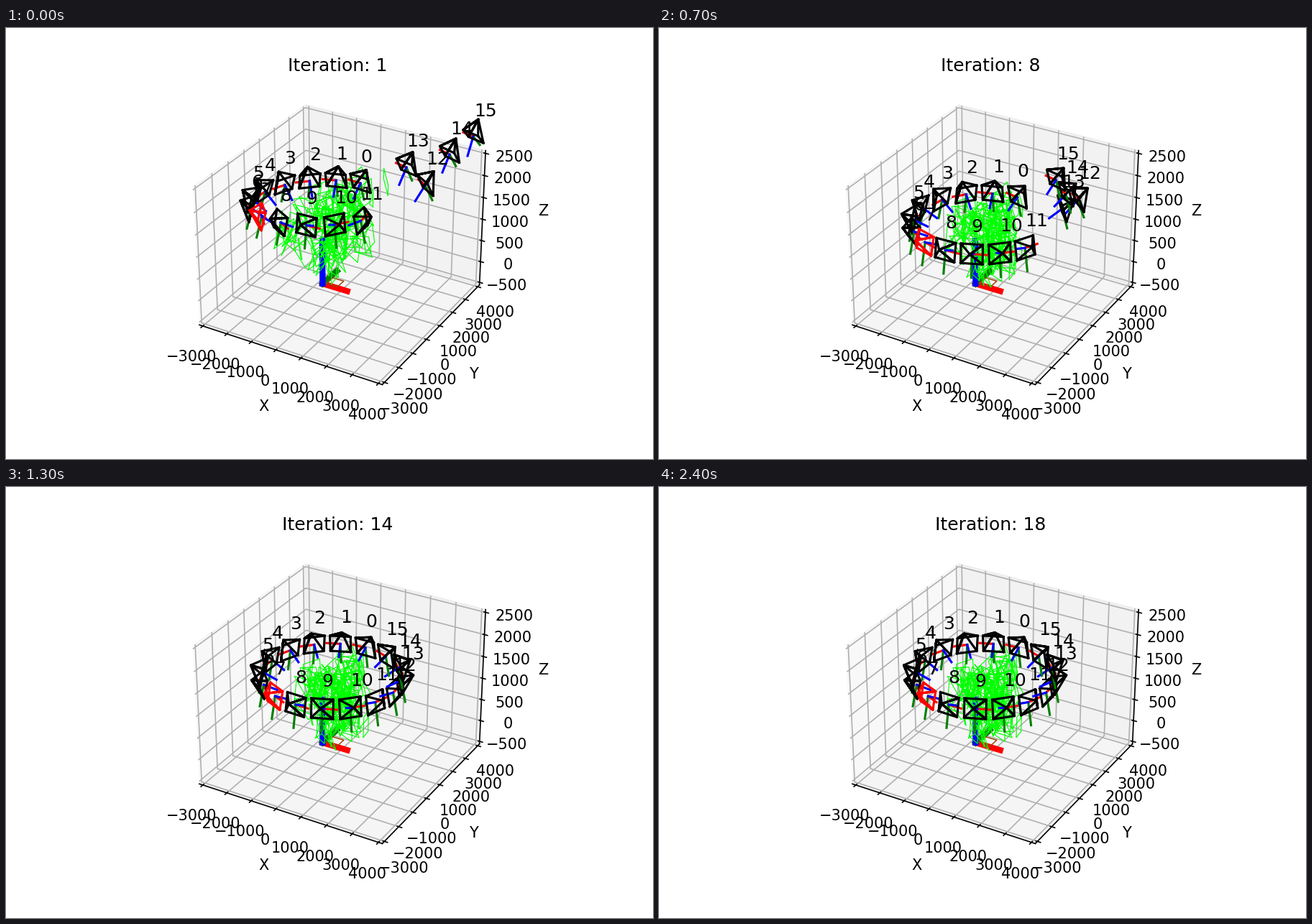
Recreate the animation shown at these times as a matplotlib script. Size 900 by 600 pixels, loop 2500 ms.

```python
import matplotlib.pyplot as plt
import numpy as np
from matplotlib.animation import FuncAnimation

plt.rcParams["figure.subplot.bottom"] = 0.125

FRAMES, INTERVAL = 25, 100
LAST_ITERATION = 18
SETTLED = 13
CAMS = 16
LOW = np.array([-3000, -3000, -500])
HIGH = np.array([4000, 4000, 2500])

# View of the default 3D camera (elev 30, azim -60), in stage pixels
CENTRE = (LOW + HIGH) / 2
SCALE = 1.82946407 / np.sqrt(41) * np.array([4, 4, 3]) / (HIGH - LOW)
C30 = np.sqrt(3) / 2
RIGHT = np.array([C30, 0.5, 0])
UP = np.array([-0.25, C30 / 2, C30])
BACK = np.array([C30 / 2, -0.75, 0.5])
NEAR = np.array([0.5, -C30, 0])
ZAXIS = np.array([0, 0, 1.0])
SIDE = 453
ZOOM = SIDE / 0.185
MID = np.array([461.25 + SIDE * (0.095 / 0.185 - 0.5),
                72 + SIDE * 0.09 / 0.185])


def lift(stage, z=1500):
    """Points of the horizontal plane z that are seen at stage pixels."""
    h, v = ((stage - MID) / ZOOM).T[:, :, None]
    ray = h * RIGHT - v * UP - BACK
    depth = ((z - CENTRE[2]) * SCALE[2] - 10 * BACK[2]) / ray[:, 2:]
    return CENTRE + (10 * BACK + depth * ray) / SCALE


# The cameras end on a ring; the last four begin far away from it
phi = np.radians(22.5 * np.arange(CAMS) - 210)
RING = np.column_stack([453 + 97 * np.sin(phi) * (1 + 0.035 * np.cos(phi)),
                        263.5 + 45.5 * np.cos(phi)])
START = np.array([[583, 219], [557, 194], [617, 176], [650, 151]])
PARKED = np.array([[628, 190], [590, 205], [618, 179], [614, 150]])
PARK_STEP = 3
RELEASE = np.array([[5], [3], [3], [3]])

AXIS = 500
HALF_W, HALF_H, DEPTH = 370, 205, 440
EDGES = [1, 2, 3, 4, 1, 0, 2, 0, 3, 0, 4]
LABEL_RISE = 480 * ZAXIS

# Calibration boards
BOARDS = 95
rng = np.random.default_rng(12)
turn = rng.uniform(0, 2 * np.pi, BOARDS)
radius = 1150 * np.sqrt(rng.uniform(0, 1, BOARDS))
home = np.column_stack([390 + radius * np.cos(turn),
                        80 + radius * np.sin(turn),
                        rng.uniform(420, 1680, BOARDS)])
drift = rng.normal(0, 1, (BOARDS, 1)).clip(-2, 2) * (480 * RIGHT + 190 * ZAXIS)
drift += 250 * ZAXIS - 150 * RIGHT
yaw = rng.uniform(0, 2 * np.pi, BOARDS)
edge_a = 290 * np.column_stack([np.cos(yaw), np.sin(yaw),
                                rng.normal(0, 0.25, BOARDS)])
edge_b = rng.normal(0, 1, (BOARDS, 3)) * [110, 110, 0] + 215 * ZAXIS


def drag(step):
    return max(1 - step / 9, 0)


def stage_positions(step):
    """Ring that drifts and bobs into place, with strays flying in."""
    pull, near = drag(step), np.cos(phi)
    bob = -20 * np.cos(np.pi * step / 6.6) * max(1 - step / SETTLED, 0)
    stage = RING + np.column_stack([-pull * (14 + 8 * near),
                                    bob - 14 * pull * near])
    away = START + (PARKED - START) * min(step / PARK_STEP, 1)
    done = np.clip((step - RELEASE) / (SETTLED - RELEASE), 0, 1)
    stage[-4:] = RING[-4:] + (1 - done) ** 2.5 * (away - RING[-4:])
    return stage


def camera_frames(step):
    """Positions and right, down, forward vectors of all cameras."""
    stage, pull = stage_positions(step), drag(step)
    pos = lift(stage)
    to = lift(np.array([[453 - 13 * pull, 264 - 10 * pull]])) - pos
    psi = np.arctan2(to @ RIGHT, to @ NEAR)[:, None]
    offset = np.linalg.norm(stage - RING, axis=1)[:, None]
    pitch = np.radians(18 + 0.2 * offset + 10 * pull * np.cos(psi))
    ahead = np.sin(psi) * RIGHT + np.cos(psi) * NEAR
    right = np.sin(psi) * NEAR - np.cos(psi) * RIGHT
    down = -np.cos(pitch) * ZAXIS - np.sin(pitch) * ahead
    forward = np.cos(pitch) * ahead - np.sin(pitch) * ZAXIS
    return pos, right, down, forward


def board_lines(step):
    mid = home + drag(step) * drift
    corners = [mid + a * edge_a + b * edge_b
               for a, b in ((-1, -1), (1, -1), (1, 1), (-1, 1), (-1, -1))]
    gap = np.full_like(mid, np.nan)
    return np.stack(corners + [gap], axis=1).reshape(-1, 3)


fig = plt.figure(figsize=(6, 4), dpi=150)
ax = fig.add_subplot(projection="3d")
margin = (HIGH - LOW) / 48
lims = np.column_stack([LOW - margin, HIGH + margin])
ax.set(xlim=lims[0], ylim=lims[1], zlim=lims[2],
       xlabel="X", ylabel="Y", zlabel="Z")
ax.set_xticks(range(-3000, 4001, 1000))
ax.set_yticks(range(-3000, 4001, 1000))
ax.set_zticks(range(-500, 2501, 500))
title = ax.set_title("Iteration: 1")


def line(color, width=1.5):
    return ax.plot([], [], [], color=color, lw=width)[0]


COLORS = ("red", "green", "blue")
for color, tip in zip(COLORS, 1000 * np.eye(3)):
    line(color, 4).set_data_3d(*np.array([[0, 0, 0], tip]).T)
line("#a04000", 0.7).set_data_3d([100, 560, 560, 100, 100],
                                 [80, 80, 520, 520, 80], [0] * 5)
boards = line("lime", 0.55)
cams = []
for n in range(CAMS):
    axes = [line(c) for c in COLORS]
    body = line("red" if n == 7 else "black")
    cams.append((axes, body, ax.text(0, 0, 0, str(n), fontsize=12)))


def update(step):
    title.set_text(f"Iteration: {min(step + 1, LAST_ITERATION)}")
    boards.set_data_3d(*board_lines(step).T)
    for (axes, body, label), p, r, d, f in zip(cams, *camera_frames(step)):
        for art, v in zip(axes, (r, d, f)):
            art.set_data_3d(*np.array([p, p + AXIS * v]).T)
        w, h = HALF_W * r, HALF_H * d
        points = np.array([p - DEPTH * f,
                           p - w - h, p + w - h, p + w + h, p - w + h])
        body.set_data_3d(*points[EDGES].T)
        label.set_position_3d(p + LABEL_RISE)
    return []


anim = FuncAnimation(fig, update, frames=FRAMES, interval=INTERVAL,
                     repeat=True)
plt.show()
```
